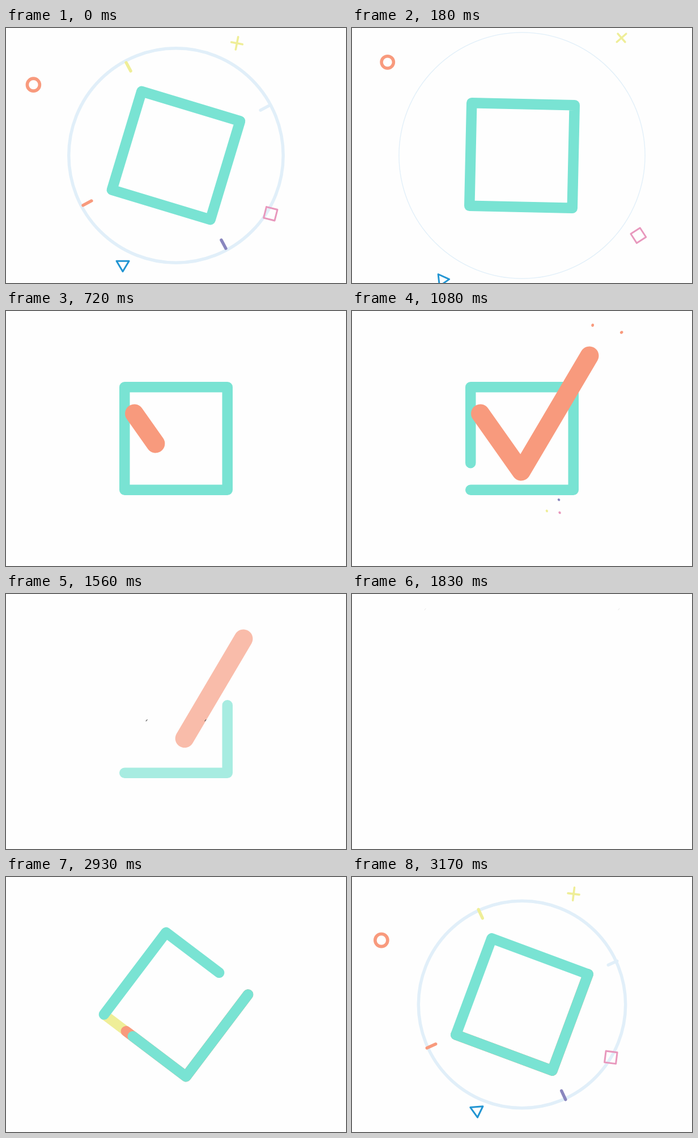
Recreate the animation shown at these times as an HTML page with a canvas. Size 600 by 450 pixels, loop 3200 ms.

```html
<!DOCTYPE html>
<html lang="en">
<head>
<meta charset="utf-8">
<title>Checkbox loop</title>
<style>
html, body { margin: 0; width: 100%; height: 100%; overflow: hidden; background: #fefefe; }
canvas { display: block; width: 600px; height: 450px; }
</style>
</head>
<body>
<canvas id="stage" width="600" height="450"></canvas>
<script>
const LOOP = 3200;
const ctx = document.getElementById('stage').getContext('2d');
const TEAL = '#79e3d3', ORANGE = '#f89a7d', YELLOW = '#efee98', PALE = '#e1eff9';
const PURPLE = '#8986be', PINK = '#e898bd', BLUE = '#2295d2';
const HALF = 90.75, BAR = 18.5, PEAK = 37.2, RAD = Math.PI / 180;

const span = (t, a, b) => Math.min(1, Math.max(0, (t - a) / (b - a)));
const mix = (a, b, p) => a + (b - a) * p;
const easeOut = x => 1 - (1 - x) ** 2;
const smooth = x => x * x * (3 - 2 * x);
const smoother = x => x * x * x * (10 - 15 * x + 6 * x * x);

// Launched parts slow down exponentially; t is negative before the loop point.
const decay = t => Math.exp(-t / 300);
const KNOTS = [-30, 0, 450].map(decay);

// Parabola in s through one value per knot.
function curve([a, b, c], s) {
  const [u, v, w] = KNOTS, d1 = (b - a) / (v - u), d2 = (c - b) / (w - v);
  return a + (s - u) * (d1 + (s - v) * (d2 - d1) / (w - u));
}

function trace(pts, close) {
  ctx.beginPath();
  pts.forEach(([x, y]) => ctx.lineTo(x, y));
  if (close) ctx.closePath();
}

function stroke(color, width) {
  ctx.strokeStyle = color;
  ctx.lineWidth = width;
  ctx.stroke();
}

function circle(r, color, width) {
  ctx.beginPath();
  ctx.arc(0, 0, r, 0, 7);
  stroke(color, width);
}

// Draws the part of a polyline between two fractions of its length.
function trim(pts, from, to, color, width) {
  if (to <= from) return;
  let len = 0;
  for (let i = 1; i < pts.length; i++)
    len += Math.hypot(pts[i][0] - pts[i - 1][0], pts[i][1] - pts[i - 1][1]);
  trace(pts);
  if (from > 0 || to < 1) {
    ctx.setLineDash([len * (to - from), 9999]);
    ctx.lineDashOffset = -len * from;
  }
  stroke(color, width);
  ctx.setLineDash([]);
}

function at(x, y, deg, scale, draw) {
  ctx.save();
  ctx.translate(x, y);
  ctx.rotate(deg * RAD);
  ctx.scale(scale, scale);
  draw();
  ctx.restore();
}

const BL = [-HALF, HALF], TL = [-HALF, -HALF], TR = [HALF, -HALF], BR = [HALF, HALF];
const BOX = [BL, TL, TR, BR, BL];
const CHECK = [[226.5, 181], [298.5, 283], [419, 79]];

const pieces = [
  {
    x: [390.5, 407, 522], y: [30, 27, 14], spin: [7, 11, 96],
    draw() {
      trace([[-10, 0], [10, 0]]); stroke(YELLOW, 3.6);
      trace([[0, -11.3], [0, 11.3]]); stroke(YELLOW, 3.6);
    }
  },
  {
    x: [52, 48.5, 102], y: [112, 100.5, 41], spin: [0, 0, 0],
    draw() { circle(11, ORANGE, 5.6); }
  },
  {
    x: [456.5, 466.5, 529], y: [318, 327.5, 391.5], spin: [7, 14, 101],
    draw() {
      trace([[-10, -10], [10, -10], [10, 10], [-10, 10]], true);
      stroke(PINK, 3);
    }
  },
  {
    x: [221, 206.5, 140], y: [412.5, 418, 468], spin: [-5, 0, 45],
    draw() {
      trace([[-11, -7], [11, -7], [0, 11.5]], true);
      stroke(BLUE, 3);
    }
  }
];

const unwind = t => PEAK * (1 - smoother(span(t, -304, 276)));

function launch(t) {
  const s = decay(t), pop = smooth(span(t, -210, -110));
  const thin = 1 - span(t, 30, 230);
  if (thin) at(300, 225, 0, 1, () => circle(251 - 62 * s, PALE, 5.5 * thin));

  const tick = 17 * pop * (1 - span(t, 0, 120)), end = 201 - 15 * s;
  if (tick) {
    [YELLOW, PALE, PURPLE, ORANGE].forEach((color, i) =>
      at(300, 225, unwind(t) - 135 + 90 * i, 1, () => {
        trace([[end - tick, 0], [end, 0]]);
        stroke(color, 5.4);
      }));
  }

  const size = pop * (0.94 + 0.06 * s) * (1 - span(t, 450, 640));
  if (size)
    for (const p of pieces)
      at(curve(p.x, s), curve(p.y, s), curve(p.spin, s), size, p.draw);
}

function build(t) {
  const p = easeOut(span(t, 2340, 2780));
  const turn = p < 1 ? mix(-127, PEAK, p) : unwind(t - LOOP);
  at(300, 225, turn, p, () => {
    const lower = [TR, BR, BL];
    const lead = ms => smooth(span(t, 2440, 2440 + ms));
    trim(lower, 0, lead(510), YELLOW, BAR - 1);
    trim(lower, 0, lead(638), ORANGE, BAR);
    trim(lower, 0, lead(670), TEAL, BAR);
    trim([BL, TL, TR], 0, lead(670), TEAL, BAR);
  });
}

function box(t) {
  ctx.globalAlpha = 1 - span(t, 1455, 1755);
  at(300, 225, unwind(t), 1, () =>
    trim(BOX, smooth(span(t, 894, 2091)), 1, TEAL, BAR));
  trim(CHECK, smooth(span(t, 1104, 2104)), smooth(span(t, 640, 940)), ORANGE, 33);
  ctx.globalAlpha = 1;
}

// A fan of shrinking sparks; every second one flies further.
function burst(t, start, [x, y], angle, step, reach, colors) {
  const p = span(t, start, 1150);
  if (p <= 0 || p >= 1) return;
  const r = 6 * Math.sqrt(1 - p) * Math.min(1, p * 5);
  colors.forEach((color, i) =>
    at(x, y, angle + step * i, 1, () => {
      ctx.fillStyle = color;
      ctx.beginPath();
      ctx.ellipse((reach + 17 * (i % 2)) * easeOut(p), 0, r * 0.95, r * 0.8, 0, 0, 7);
      ctx.fill();
    }));
}

function flecks(t) {
  const p = span(t, 1555, 1860);
  if (p <= 0 || p >= 1) return;
  ctx.globalAlpha = 1 - p;
  for (const side of [-1, 1]) {
    const x = 300 + side * mix(47, 172, easeOut(p)), y = mix(231, 25, easeOut(p));
    trace([[x - 1, y + 1.2], [x + 1, y - 1.2]]);
    stroke('#555', 1.2);
  }
  ctx.globalAlpha = 1;
}

function render(t) {
  ctx.fillStyle = '#fefefe';
  ctx.fillRect(0, 0, 600, 450);
  ctx.lineCap = ctx.lineJoin = 'round';
  const u = t < 1600 ? t : t - LOOP;
  if (u >= -210) launch(u);
  if (t >= 2445) build(t);
  else if (t < 1860) {
    box(t);
    burst(t, 760, CHECK[1], 37, 10, 86, [PURPLE, PINK, YELLOW]);
    burst(t, 880, CHECK[2], -84, 48, 58, [ORANGE, ORANGE]);
    flecks(t);
  }
}

const begin = performance.now();
function tick() {
  render((performance.now() - begin) % LOOP);
  requestAnimationFrame(tick);
}
tick();
</script>
</body>
</html>
```
